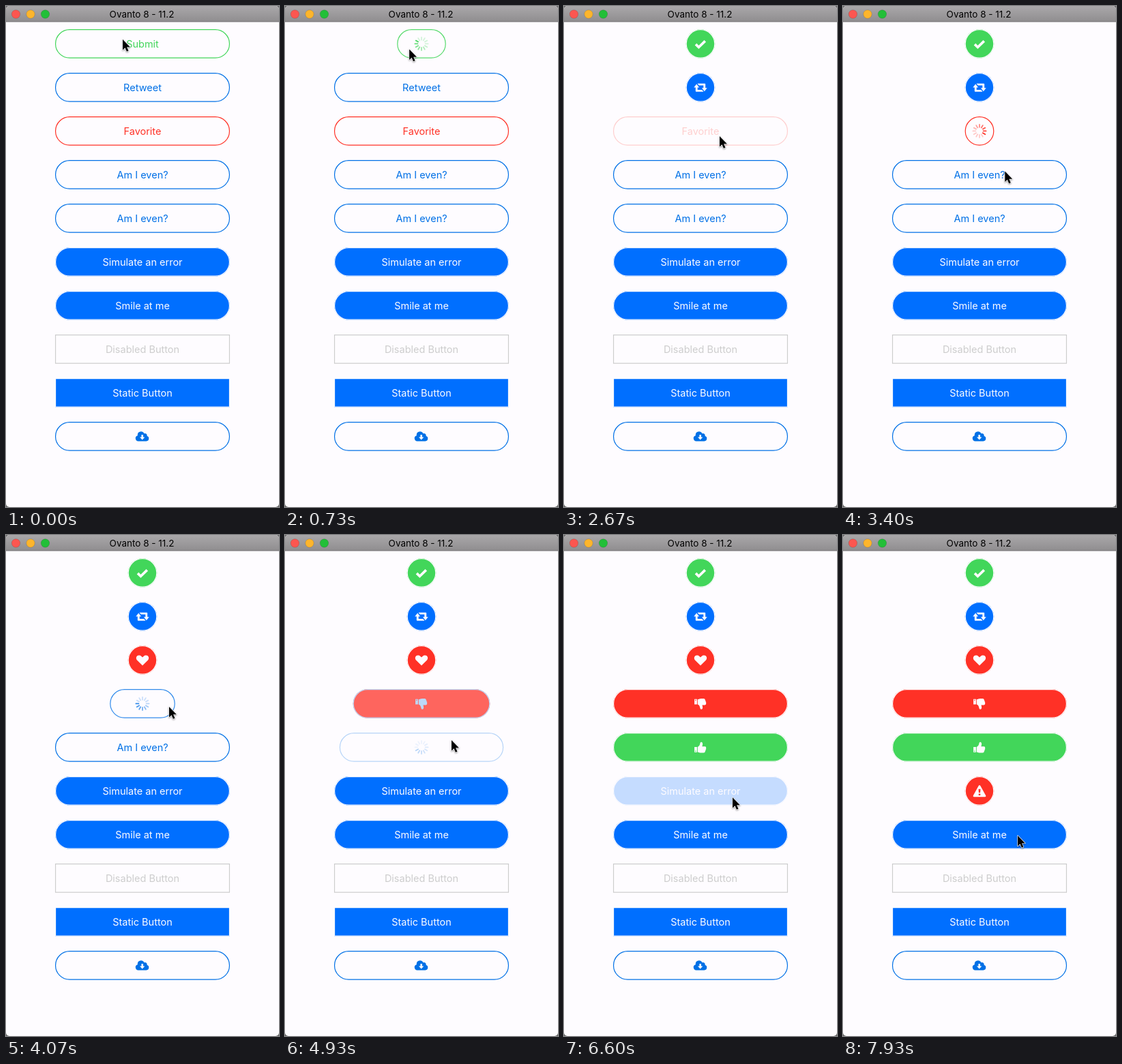
These frames come from a looping animation (400 px wide and 735 px high, 8000 ms). An HTML page:

```html
<!DOCTYPE html>
<html lang="en">
<head>
<meta charset="utf-8">
<title>Animated buttons</title>
<style>
  html, body { margin: 0; width: 100%; height: 100%; overflow: hidden; background: #666; }
  svg { display: block; width: 400px; height: 735px; }
  text { font: 14.5px Inter, "Open Sans", sans-serif; text-anchor: middle; }
  .title { font-size: 13.5px; }
  .icon { fill: currentColor; fill-rule: evenodd; }
  .check { fill: none; stroke: currentColor; stroke-width: 3.7; }
  .spinner line { stroke: currentColor; stroke-width: 1.8; stroke-linecap: round; }
  .outline { fill: none; stroke: currentColor; stroke-width: 1.2; }
  #cursor path { stroke: #fff; stroke-width: 1.3; paint-order: stroke; stroke-linejoin: round; }
  #cursor { filter: drop-shadow(0 1px 1px #0006); }
</style>
</head>
<body>
<svg viewBox="0 0 400 735">
  <defs>
    <linearGradient id="bar" x2="0" y2="1">
      <stop stop-color="#aaa8aa"/>
      <stop offset="1" stop-color="#8f8d8f"/>
    </linearGradient>
    <clipPath id="window"><rect width="400" height="735" rx="5"/></clipPath>

    <path id="check" class="check" d="M-7 .3L-2.6 4.7 6.8-4.4"/>
    <g id="retweet" class="icon">
      <path id="half" d="M-9.7-.4L-5.8-5.4-1.9-.4H-4.3V3.2H2.2L4.5 6H-6.2Q-7.2 6-7.2 5V-.4Z"/>
      <use href="#half" transform="rotate(180)"/>
    </g>
    <path id="heart" class="icon" d="M0 7.6L-7.6 .2C-10.4-2.6-9.4-7.4-5-7.4C-2.5-7.4-.9-5.4 0-4.3C.9-5.4 2.5-7.4 5-7.4C9.4-7.4 10.4-2.6 7.6 .2Z"/>
    <path id="up" class="icon" d="M-8.9-.8H-5.1V7H-8.9ZM-7.8 4.7V6H-6.5V4.7ZM-4.2-.8C-2-1.5-.8-4-.6-6Q-.3-8.2 1.2-8C4-7.6 3.2-3.5 2.4-1.6H6.4Q8.7-1.4 8.1 1Q8.6 2.2 7.6 3.2Q7.8 4.6 6.8 5.2Q7 7.6 4.5 7.8H1C-1 7.8-2.5 6.8-4.2 6.6Z"/>
    <use id="down" href="#up" transform="scale(1 -1)"/>
    <path id="warning" class="icon" d="M-1.2-8Q0-9.6 1.2-8L9.2 6.4Q9.8 8.2 8.2 8.4H-8.2Q-9.8 8.2-9.2 6.4ZM-1.5-3L-1.1 2.3H1.1L1.5-3ZM-1.3 3.7V6.1H1.3V3.7Z"/>
    <path id="cloud" class="icon" d="M-5.5 6.6A4.2 4.2 0 0 1-7.2-1.6A5.2 5.2 0 0 1 2.6-4.6A3 3 0 0 1 6.6-1A3.9 3.9 0 0 1 5.6 6.6ZM-1.6-2.8V.8H-4L-.3 4.6 3.4 .8H1V-2.8Z"/>
  </defs>

  <g clip-path="url(#window)">
    <rect width="400" height="735" fill="#fefcff"/>
    <rect width="400" height="23" fill="url(#bar)"/>
    <path d="M0 23H400" stroke="#757375"/>
    <g stroke="#0003" stroke-width=".7">
      <circle cx="14.5" cy="12" r="6.2" fill="#fc5650"/>
      <circle cx="36" cy="12" r="6.2" fill="#fdb52c"/>
      <circle cx="57.5" cy="12" r="6.2" fill="#22bf38"/>
    </g>
    <text class="title" x="199" y="17">Ovanto 8 - 11.2</text>
    <g id="buttons"></g>
    <g id="cursor"><path d="M0 0V15.4L3.5 12.2 5.9 17.8 8.5 16.7 6.1 11.2H10.9Z"/></g>
  </g>
</svg>

<script>
const LOOP = 8000, WIDTH = 256, SIZE = 42.67, PITCH = 64, FIRST_Y = 55.4;
const FADE = 250, PRESS = 150, HELD = 200, LOADING = 862;
const WHITE = [254, 252, 255], BLUE = [0, 111, 255], LINE_BLUE = [0, 112, 230];
const GREEN = [66, 214, 90], RED = [255, 49, 38], GRAY = [205, 205, 205];

// release: when the finger lifts; grow: the result opens back to full width
const specs = [
  { label: 'Submit', line: GREEN, done: GREEN, icon: 'check', release: 545 },
  { label: 'Retweet', line: LINE_BLUE, done: BLUE, icon: 'retweet', release: 1555 },
  { label: 'Favorite', line: RED, done: RED, icon: 'heart', release: 2720 },
  { label: 'Am I even?', line: LINE_BLUE, done: RED, icon: 'down', release: 3908, grow: true },
  { label: 'Am I even?', line: LINE_BLUE, done: GREEN, icon: 'up', release: 4882, grow: true },
  { label: 'Simulate an error', filled: true, line: BLUE, done: RED, icon: 'warning', release: 6622 },
  { label: 'Smile at me', filled: true, line: BLUE },
  { label: 'Disabled Button', square: true, line: GRAY },
  { label: 'Static Button', filled: true, square: true, line: BLUE },
  { line: LINE_BLUE, icon: 'cloud' }
];

// time, x, y of the pointer tip
const pointerPath = [
  [0, 171, 49], [300, 178, 57], [570, 178, 57], [1300, 221, 125], [1580, 221, 125],
  [2450, 228, 191], [2750, 228, 191], [3650, 239, 252], [4100, 239, 252],
  [4650, 244, 301], [5000, 244, 301], [6350, 247, 385], [6700, 247, 385],
  [7700, 256, 441], [8000, 256, 441]
];

const clamp = v => Math.min(1, Math.max(0, v));
const ease = v => v < .5 ? 2 * v * v : 1 - 2 * (1 - v) ** 2;
const progress = (time, start, length) => ease(clamp((time - start) / length));
const lerp = (a, b, p) => a + (b - a) * p;
const mix = (a, b, p) => `rgb(${a.map((v, i) => Math.round(lerp(v, b[i], p)))})`;

function add(parent, tag, attrs = {}) {
  const node = document.createElementNS('http://www.w3.org/2000/svg', tag);
  set(node, attrs);
  return parent.appendChild(node);
}

function set(node, attrs) {
  for (const name in attrs) node.setAttribute(name, attrs[name]);
}

function show(node, visible) {
  if (node) node.style.display = visible ? '' : 'none';
}

function box(node, width, inset, square) {
  const w = width - 2 * inset, h = SIZE - 2 * inset;
  set(node, { x: -w / 2, y: -h / 2, width: w, height: h, rx: square ? 0 : h / 2 });
}

function createSpinner(parent) {
  const spinner = add(parent, 'g', { class: 'spinner' });
  for (let i = 0; i < 12; i++) {
    add(spinner, 'line', {
      y1: -5.6, y2: -9.6, transform: `rotate(${-30 * i})`, opacity: Math.max(.25, 1 - i * .11)
    });
  }
  return spinner;
}

function createButton(spec, index) {
  const group = add(document.getElementById('buttons'), 'g', {
    transform: `translate(200 ${FIRST_Y + index * PITCH})`
  });
  const parts = {
    spec, group,
    fill: add(group, 'rect'),
    outline: add(group, 'rect', { class: 'outline' })
  };
  if (spec.label) {
    parts.label = add(group, 'text', { y: 5.4, fill: 'currentColor' });
    parts.label.textContent = spec.label;
  }
  if (spec.icon) parts.icon = add(group, 'use', { href: '#' + spec.icon, y: .4 });
  if (spec.release) parts.spinner = createSpinner(group);
  return parts;
}

function drawButton({ spec, group, fill, outline, label, icon, spinner }, time) {
  const { release = Infinity, filled, square, line, done = line, grow } = spec;
  const finish = release + LOADING;
  const pressed = progress(time, release - HELD, PRESS);
  const loaded = progress(time, release, FADE);
  const result = progress(time, finish, FADE);
  const width = lerp(WIDTH, SIZE, grow ? loaded - result : loaded);

  group.style.color = mix(filled ? WHITE : line, WHITE, result);
  group.style.opacity = lerp(1, .22, pressed - loaded);
  box(fill, width, 0, square);
  box(outline, width, .55, square);
  set(fill, { fill: mix(filled ? line : done, done, result), 'fill-opacity': filled ? 1 : result });

  show(label, time < release);
  show(icon, !label || time >= finish);
  if (spinner) {
    show(spinner, time >= release && time < finish);
    const step = 8 + Math.floor(Math.max(0, time - release) * 12 / 1000);
    set(spinner, { transform: `rotate(${step * 30})` });
  }
}

function drawPointer(time) {
  const next = pointerPath.findIndex(point => point[0] > time);
  const [t0, x0, y0] = pointerPath[next - 1], [t1, x1, y1] = pointerPath[next];
  const p = progress(time, t0, t1 - t0);
  set(document.getElementById('cursor'), {
    transform: `translate(${lerp(x0, x1, p)} ${lerp(y0, y1, p)})`
  });
}

const buttons = specs.map(createButton);

function draw(now) {
  const time = now % LOOP;
  buttons.forEach(button => drawButton(button, time));
  drawPointer(time);
}

let start;
function tick(now) {
  start ??= now;
  draw(now - start);
  requestAnimationFrame(tick);
}
draw(0);
requestAnimationFrame(tick);
</script>
</body>
</html>
```
